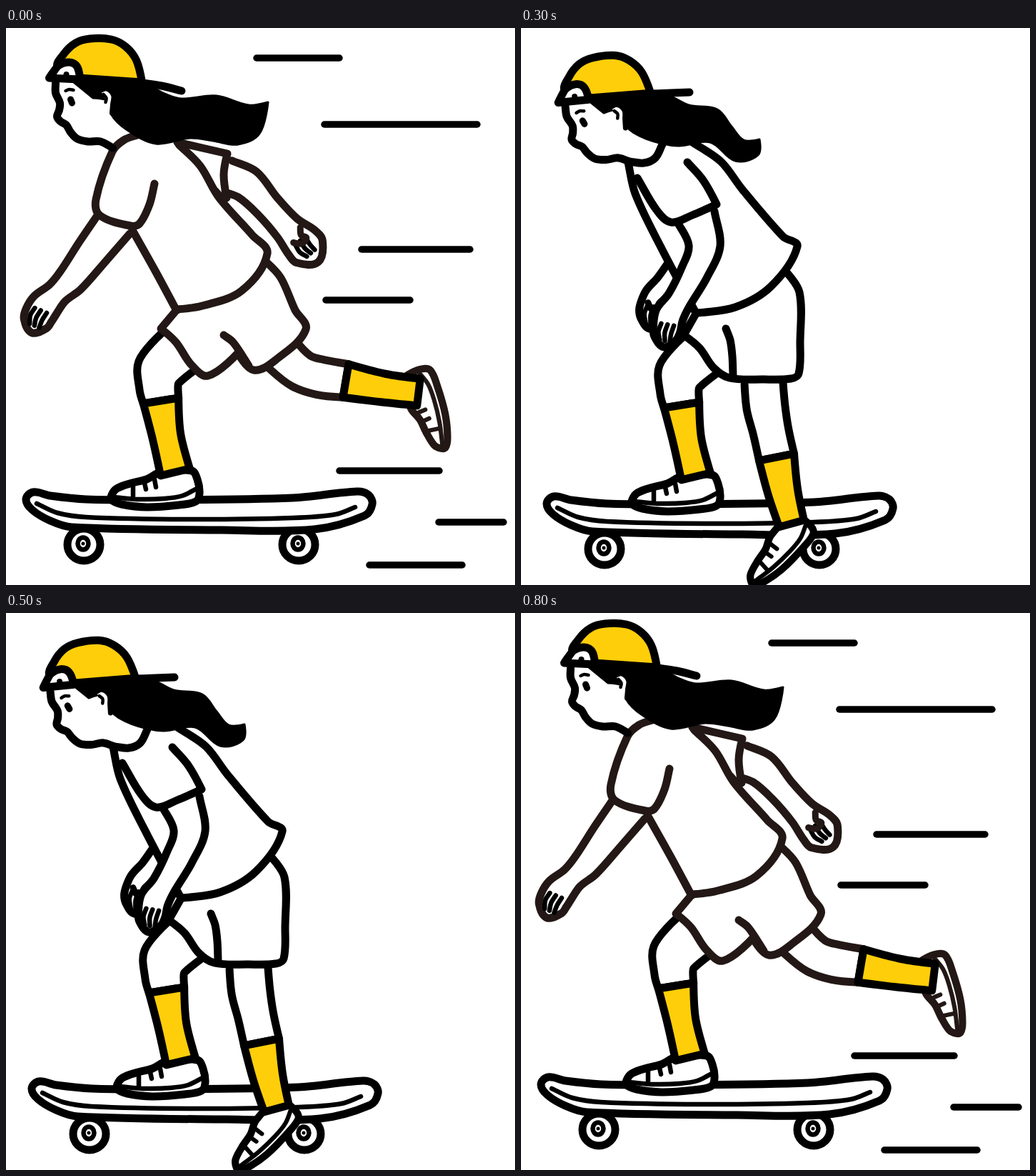
Write an HTML page that moves like this. It is 713 px wide and 780 px high and loops after 900 ms.

```html
<!DOCTYPE html>
<html lang="en">
<head>
<meta charset="utf-8">
<title>Skater</title>
<style>
html, body { margin: 0; width: 100%; height: 100%; overflow: hidden; background: #fff; }
svg { display: block; width: 100%; height: 100%; }
</style>
</head>
<body>
<svg id="stage" viewBox="0 0 713 780" fill="none" stroke-linecap="round" stroke-linejoin="round"></svg>
<script>
const BLACK = '#000', BROWN = '#231815', YELLOW = '#ffce0a', WHITE = '#fff';
const STEP = 100, PEN = 11, FINE = 6.5;

// Smooth curve through "x,y" points; "!" marks a corner, "|" starts a new stroke.
function curve(text, closed) {
  return text.split('|').map(part => {
    const pts = part.trim().split(/\s+/).map(t => {
      const [x, y] = t.replace('!', '').split(',').map(Number);
      return { x, y, corner: t.endsWith('!') };
    });
    const n = pts.length;
    const at = i => closed ? pts[(i + n) % n] : pts[Math.max(0, Math.min(n - 1, i))];
    const handle = (i, reach) => {
      const p = at(i), a = at(i - 1), b = at(i + 1);
      if (p.corner) return `${p.x} ${p.y}`;
      const k = reach / (Math.hypot(b.x - a.x, b.y - a.y) || 1);
      return `${p.x + (b.x - a.x) * k} ${p.y + (b.y - a.y) * k}`;
    };
    let d = `M${pts[0].x} ${pts[0].y}`;
    for (let i = 0; i < (closed ? n : n - 1); i++) {
      const p = at(i), q = at(i + 1);
      const reach = Math.hypot(q.x - p.x, q.y - p.y) / 3;
      d += `C${handle(i, reach)} ${handle(i + 1, -reach)} ${q.x} ${q.y}`;
    }
    return d + (closed ? 'Z' : '');
  }).join('');
}

const path = (d, ink, width, fill) =>
  `<path d="${d}" stroke="${ink}" stroke-width="${width}" fill="${fill}"/>`;
const line = (pts, ink = BLACK, width = PEN) => path(curve(pts), ink, width, 'none');
const open = (pts, ink = BLACK, fill = WHITE) => path(curve(pts), ink, PEN, fill);
const shape = (pts, ink = BLACK, fill = WHITE, width = PEN) => path(curve(pts, true), ink, width, fill);
const oval = (x, y, rx, ry, width, fill = WHITE) =>
  `<ellipse cx="${x}" cy="${y}" rx="${rx}" ry="${ry}" stroke="${BLACK}" stroke-width="${width}" fill="${fill}"/>`;
const move = (x, y, turn, body, scale = 1) =>
  `<g transform="translate(${x} ${y}) rotate(${turn}) scale(${scale})">${body}</g>`;

// A limb is a spine of "x,y,r" points; its outline lies r to both sides.
function limb(spine) {
  const pts = spine.split(' ').map(t => t.split(',').map(Number));
  const left = [], right = [];
  let dir;
  pts.forEach(([x, y, r], i) => {
    const [ax, ay] = pts[Math.max(0, i - 1)];
    const [bx, by] = pts[Math.min(pts.length - 1, i + 1)];
    const len = Math.hypot(bx - ax, by - ay);
    dir = [(bx - ax) / len, (by - ay) / len];
    left.push(`${x + dir[1] * r},${y - dir[0] * r}`);
    right.push(`${x - dir[1] * r},${y + dir[0] * r}`);
  });
  return { left, right, dir, end: pts[pts.length - 1] };
}

function arm(spine, ink, thumb) {
  const { left, right, dir, end: [x, y, r] } = limb(spine);
  const tip = `${x + dir[0] * r * 0.8},${y + dir[1] * r * 0.8}`;
  const fingers = [-9, 0, 9].map(a => line(`${a},-20 ${a - 2},-8 ${a * 0.8},3`, BLACK, FINE)).join('');
  const curl = thumb ? line('12,-34 6,-25 9,-17 -2,-16 -9,-24', ink, 9) : '';
  const turn = Math.atan2(dir[1], dir[0]) * 180 / Math.PI - 90;
  return open([...left, tip, ...right.reverse()].join(' '), ink) + move(x, y, turn, fingers + curl);
}

const shoe = ink =>
  shape('-89,32 -82,23 -60,15 -40,10 -20,0 23,-2 31,10 34,30 29,41 5,46 -40,49 -75,45 -89,39', ink) +
  line('-86,35 -50,38 -15,37 10,33 32,22|-59,18 -59,34|-43,15 -41,24|-29,10 -27,21', ink, FINE);

// The last three spine points carry the sock, the last one the shoe.
function leg(spine, ink, trim, foot) {
  const { left, right, end } = limb(spine);
  const tube = (from, to) => {
    const a = left.slice(from, to), b = right.slice(from, to).reverse();
    const sharp = side => side.map((p, i) => i % (side.length - 1) ? p : p + '!').join(' ');
    return sharp(a) + ' ' + sharp(b);
  };
  return open(tube(0, 4), ink) + foot(end) + shape(tube(3), trim, YELLOW);
}

const ride = {
  ink: BROWN, trim: BLACK, base: [2, 0], head: [57.5, 69, 0], toe: -102, lines: true,
  farArm: '308,207,23 338,219,22 367,250,18 394,280,19 414,300,25 425,313,24',
  farSleeve: '240,160 275,168 310,176! 305,205 309,238!',
  backLeg: '387,457,27 413,480,25 440,489,25 476,494,23.6 528,504,20 578,510,19',
  shorts: '238,396! 217,421! 238,440 260,472 283,487 325,455! 347,479 380,463 420,422 405,395 385,350 365,328!',
  fold: '305,430 318,440 333,462 340,473',
  torso: '177,283 209,340 238,394! 275,389 330,368 366,316 345,290 298,237 272,193 242,163',
  arm: '153,272,26 122,312,23 90,354,19 72,371,16 55,388,20 46,402,20 41,414,17',
  sleeve: '187,149 165,157 149,173 126,240 131,262 174,277 187,274 201,247 208,218',
  hair: '150,105 147,120 170,143 210,162 258,154 290,158 325,163 355,148 367,104! 340,108 295,95 245,99 222,92 200,82 95,76! 122,98!',
  visor: '191,77 218,81 246,88'
};

const push = {
  ink: BLACK, trim: BLACK, base: [0, 0], head: [55, 70, 0], toe: -87,
  farArm: '296,224,14 310,246,17 316,270,17 314,290,14 310,300,10 308,306,6',
  farSleeve: '240,157 275,172 307,206! 299,218 291,231!',
  backLeg: '349,469,27 364,500,28 388,523,25 421,541,20.5 465,565,19 508,590,18',
  shorts: '236,396! 215,421! 235,437 258,470 280,487 302,473! 318,476 350,464 393,446 386,410 378,360 362,328!',
  fold: '279,412 290,428 298,455 302,473',
  torso: '193,320 214,350 236,394! 273,390 328,371 364,314 343,291 290,232 269,193 239,162',
  arm: '176,280,26 166,322,23 154,364,21 145,391,20 135,412,21 130,434,22 128,455,18',
  sleeve: '185,149 163,157 143,174 138,245 148,276 203,274 211,268 212,245 209,208',
  hair: '148,105 146,120 170,142 205,159 245,152 270,150 295,158 322,160 346,138 318,129 288,109 262,100 225,98 195,82 95,76! 120,98!',
  visor: '188,77 215,82 243,89'
};

const crouch = {
  ink: BROWN, trim: BROWN, base: [0, 0], head: [27, 113, -7], toe: -54,
  farArm: '214,333,18 203,355,17 192,373,21 187,388,25 185,398,25 183,408,21',
  backLeg: '274,465,29 267,495,29.5 270,522,28 291,567,19 313,612,18 338,657,18',
  shorts: '248,378! 230,405 214,422! 240,445 285,465 325,472 340,440 365,395 375,355 367,335!',
  fold: '244,415 239,437',
  torso: '117,198 133,248 200,320 255,365! 290,380 350,346 398,266 372,255 340,230 285,195 230,160',
  arm: '262,254,27 285,288,22 281,325,18 272,366,18 269,395,20 269,414,21 270,427,18',
  sleeve: '243,193 265,210 283,230! 260,248 235,270 215,265 200,250',
  hair: '123,128 130,155 160,168 200,169 250,156 285,136 315,136 338,107! 310,108 260,98 218,104 217,97! 165,97! 70,113! 96,132!',
  visor: '163,103 188,101 213,101',
  neck: '130,199 150,201 168,190 178,167'
};

const stand = {
  ink: BLACK, trim: BLACK, base: [10, 6], head: [49, 104, -8.5], toe: -42,
  farArm: '220,335,15 205,358,16 193,377,20 187,390,20 184,400,19 182,410,14',
  backLeg: '340,497,27 343,531,27 350,565,25 358,601,25 367,650,21 379,694,18',
  shorts: '245,400! 228,430! 250,448 270,476 292,490 340,492 378,491 389,484 391,440 390,370 370,340!',
  fold: '287,421 293,437 296,460 297,487',
  torso: '150,188 160,232 195,305 245,399! 300,391 350,362 387,306 367,292 310,226 280,187 240,160',
  arm: '245,264,27 257,305,22 243,342,19 222,380,17 208,402,20 204,423,19 202,435,15',
  sleeve: '233,188 255,213 274,247! 240,262 210,272 190,255 163,210',
  hair: '147,115 147,137 175,155 220,165 265,160 300,186 332,178 334,156! 312,157 295,138 275,114 235,108 200,93 90,98! 116,119!',
  visor: '183,92 210,91 236,90',
  neck: '152,187 172,189 188,182 198,163'
};

// Halfway pose between two poses with matching points.
function between(a, b) {
  const out = { ...a, toe: (a.toe + b.toe) / 2, lines: false };
  for (const key in a) {
    if (Array.isArray(a[key])) out[key] = a[key].map((v, i) => (v + b[key][i]) / 2);
    else if (typeof a[key] === 'string' && a[key].includes(',')) {
      const other = b[key].match(/[\d.]+/g);
      let i = 0;
      out[key] = a[key].replace(/[\d.]+/g, v => (+v + +other[i++]) / 2);
    }
  }
  return out;
}

const wheel = x => oval(x, 723.5, 23, 22.5, PEN) + oval(x - 1, 722, 7.5, 8.5, FINE) + oval(x - 1, 722, 1, 1, 3, BLACK);

const board = wheel(107) + wheel(408) +
  shape('36,650 60,655 110,660 200,661 400,658 490,649 506,654 511,667 500,683 430,702 300,703 90,699 60,690 35,675 26,660') +
  line('41,666 70,679 110,685 250,688 400,686 460,681 487,671', BLACK, FINE);

const frontLeg = trim => leg('241,452,35 212,482,32 212,505,27 215,522,25 223,572,20 235,622,21',
  BLACK, trim, ([x, y]) => move(x, y, 0, shoe(BLACK)));

const face = open('67,78 67,92 73,106 72,116 69,125 74,132 82,137 88,147 97,156 112,160 130,160 147,169');

const cap = ink =>
  path(curve('130,88 139,86 148,95 147,108 146,120'), BLACK, 7, WHITE) +
  line('134,94 138,99 137,105|81,89 86,87 92,88', BLACK, 4.5) +
  line('88,101 90,106', BLACK, 9) +
  shape('70,56 78,38 95,22 115,16 145,17 165,27 180,46 188,77! 100,71!', ink, YELLOW) +
  shape('58,71! 65,61 72,53 86,49 97,55 101,73!') +
  line('82,66 81,73', BLACK, 8);

const speedLines = [[351, 467, 42], [446, 660, 135], [498, 650, 310], [448, 566, 381],
  [467, 607, 620], [606, 697, 692], [509, 639, 752]]
  .map(([a, b, y]) => line(`${a},${y} ${b},${y}`, BLACK, 9.5)).join('');

function figure(p) {
  const [hx, hy, turn] = p.head;
  const onHead = body => move(hx, hy, turn, `<g transform="translate(-55 -70)">${body}</g>`);
  const backFoot = ([x, y]) => move(x - 15, y + 4, p.toe, shoe(p.ink), 0.93);
  return [
    p.lines ? speedLines : '',
    arm(p.farArm, p.ink, true),
    p.farSleeve ? open(p.farSleeve, p.ink) : '',
    move(...p.base, 0, board + frontLeg(p.trim)),
    leg(p.backLeg, p.ink, p.trim, backFoot),
    shape(p.shorts, p.ink),
    line(p.fold, p.ink),
    open(p.torso, p.ink),
    arm(p.arm, p.ink),
    open(p.sleeve, p.ink),
    p.neck ? open(p.neck) : '',
    onHead(face),
    shape(p.hair, BLACK, BLACK, 3),
    line(p.visor),
    onHead(cap(p.trim))
  ].join('');
}

const rise = between(push, ride);
const cycle = [ride, rise, push, stand, crouch, stand, push, rise, ride];
const poses = [...new Set(cycle)];
const stage = document.getElementById('stage');
stage.innerHTML = poses.map(p => `<g display="none">${figure(p)}</g>`).join('');
const groups = [...stage.children];

let shown = null;
function draw(ms) {
  const pose = cycle[Math.floor(ms / STEP) % cycle.length];
  if (pose === shown) return;
  groups.forEach((g, i) => g.setAttribute('display', poses[i] === pose ? 'inline' : 'none'));
  shown = pose;
}

const start = performance.now();
function tick() {
  draw(performance.now() - start);
  requestAnimationFrame(tick);
}
tick();
</script>
</body>
</html>
```
